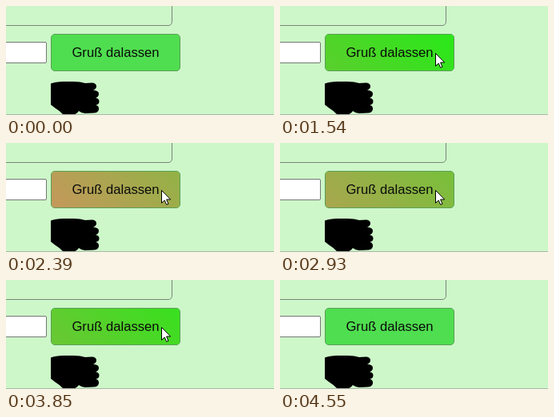
Write an HTML page that moves like this. It is 335 px wide and 137 px high and loops after 5.17 s.

```html
<!DOCTYPE html>
<html lang="de">
<head>
<meta charset="utf-8">
<title>Gruß dalassen</title>
<style>
  html, body { margin: 0; width: 100%; height: 100%; overflow: hidden; background: #cdf7c9; }
  body { position: relative; }
  body > *, .glow { position: absolute; box-sizing: border-box; }

  .area  { left: -20px; top: -40px; width: 228px; height: 65px; border: 1px solid #7b857a; border-radius: 5px; }
  .field { left: -20px; top: 45px; width: 71px; height: 27px; border: 1px solid #767676; border-radius: 2px; background: #fff; }
  .rule  { left: 0; top: 136px; width: 100%; height: 1px; background: #a9b6a7; }
  .art   { left: 0; top: 0; width: 335px; height: 137px; }

  .button {
    left: 56px; top: 35px; width: 162px; height: 47px;
    border: 1px solid #5b9e58; border-radius: 5px; overflow: hidden;
    background: #4fde4f; color: #0b0b0b; text-align: center; white-space: nowrap;
    font: 16.67px/45px Arial, "Liberation Sans", sans-serif;
  }
  .button b { position: relative; font-weight: 400; }
  .glow {
    inset: 0; opacity: 0;
    background: linear-gradient(45deg, rgb(222, 139, 102), rgb(22, 242, 16)) 0 50% / 400% 400%;
    animation: shift 5170ms ease infinite paused, hover 5170ms step-end infinite paused;
  }
  .pointer { left: 0; top: 0; width: 13px; height: 20px; animation: travel 5170ms linear infinite paused; }

  @keyframes shift {
    0%, 13.927%, 52.611%, 91.296%, 100% { background-position: 0% 50%; }
    33.269%, 71.954% { background-position: 100% 50%; }
  }
  @keyframes hover {
    0%, 81.92% { opacity: 0; }
    14.6% { opacity: 1; }
  }
  @keyframes travel {
    0%, 4.2%  { transform: translate(330px, 150px); }
    4.25%     { transform: translate(310px, 130px); }
    13.23%    { transform: translate(234px, 73px); }
    14.72%    { transform: translate(212px, 66px); }
    16.22%    { transform: translate(200px, 61px); }
    17.7%, 77.56% { transform: translate(194px, 59px); }
    79.03%    { transform: translate(198px, 62px); }
    80.53%    { transform: translate(207px, 68px); }
    82.03%    { transform: translate(224px, 79px); }
    86.51%    { transform: translate(301px, 131px); }
    88%, 100% { transform: translate(330px, 150px); }
  }
</style>
</head>
<body>
<div class="area"></div>
<div class="field"></div>
<div class="button"><span class="glow"></span><b>Gruß dalassen</b></div>
<svg class="art" viewBox="0 0 335 137">
  <path d="M56 97.5Q62 95 72 95H84Q93 95 99 97L108 96.5Q113 97 113 101Q113 104 109 106Q116 106 116 110.500Q116 114 112 115.500Q116.500 116 116.500 120Q116.500 123.500 112.500 124.500Q116.500 125.500 116 130Q115 134.500 109 134.500L99 135Q94 134.500 91 132Q88 136.500 82 137H72Q67 131.500 61 128L56 124Z"/>
</svg>
<div class="rule"></div>
<svg class="pointer" viewBox="0 0 13 20">
  <path d="M.5 .5V16.500L4.200 13L6.700 18.500L9 17.500L6.600 12H11.700Z" fill="#fff" stroke="#000"/>
</svg>
<script>
  const LOOP = 5170, START = 220, STEPS = 56, STEP = 4330 / STEPS;
  const anims = document.getAnimations();
  const origin = performance.now();

  function draw() {
    const t = (performance.now() - origin) % LOOP;
    const k = Math.min(STEPS, Math.floor((t - START + 6) / STEP));
    const held = k < 0 ? 0 : START + k * STEP;
    for (const a of anims) a.currentTime = held;
    requestAnimationFrame(draw);
  }
  draw();
</script>
</body>
</html>
```
